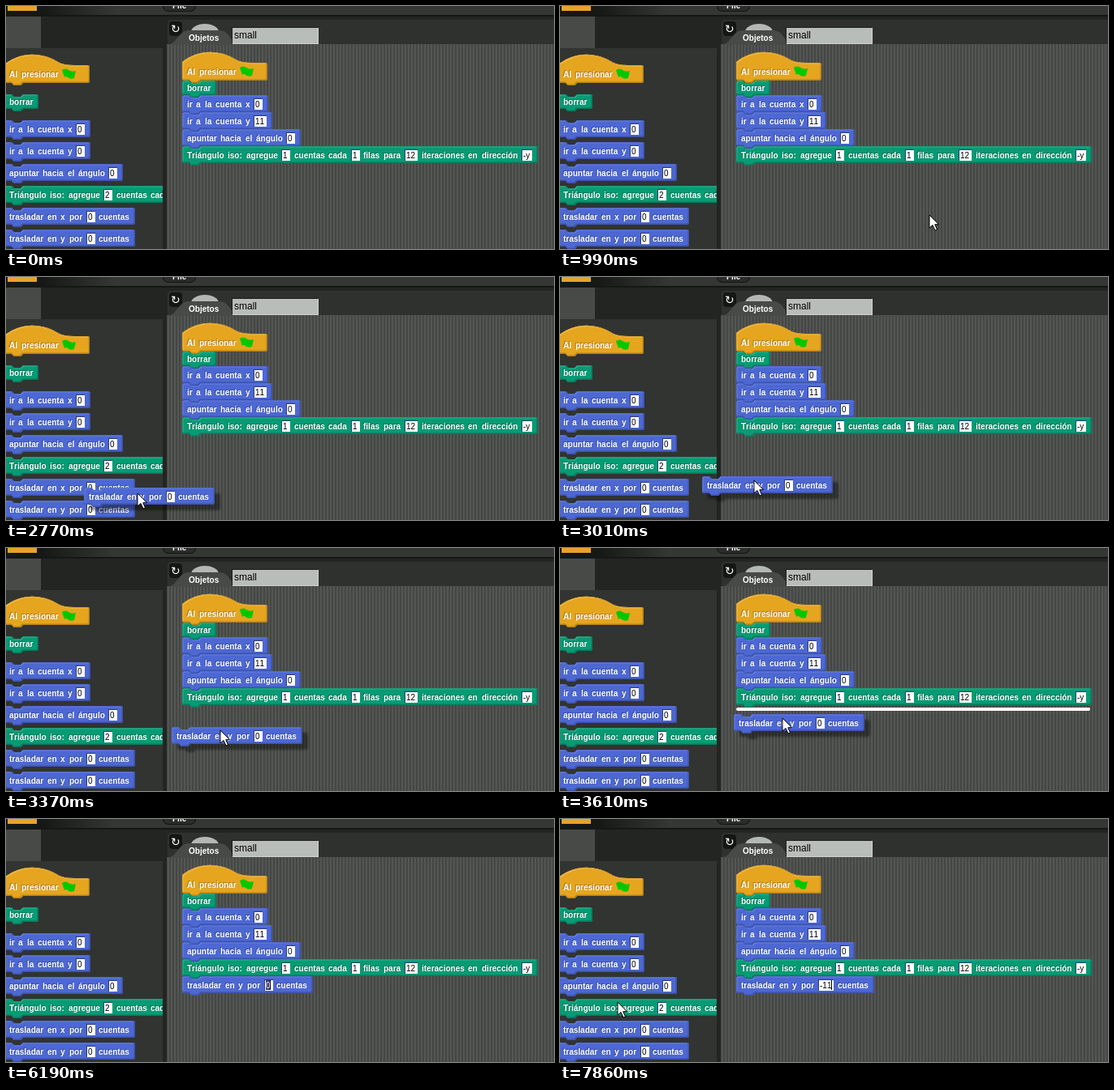
An HTML page with a canvas that plays this animation: 675x300 px, repeating every 8 s.

```html
<!DOCTYPE html>
<html lang="es">
<head>
<meta charset="utf-8">
<style>
html, body { margin: 0; width: 675px; height: 300px; overflow: hidden; background: #232523; }
canvas { display: block; }
</style>
</head>
<body>
<canvas id="stage" width="675" height="300"></canvas>
<script>
const c = document.getElementById('stage').getContext('2d');
c.fontKerning = 'none';
const FONT = '"Liberation Sans", Arial, sans-serif';
const BOLD = `bold 10px ${FONT}`, PLAIN = `10px ${FONT}`;
const GAP = 4.75, PAD = 6, LOOP = 8000;
const BLUE = { base: '#4d68d2', light: '#7189e8', dark: '#3449a0' };
const GREEN = { base: '#079b74', light: '#38bd98', dark: '#066b51' };
const GOLD = { base: '#e6a51f', light: '#f4c45c', dark: '#a97512' };

// Words in brackets are input fields.
const GO_X = 'ir a la cuenta x [0]';
const POINT = 'apuntar hacia el ángulo [0]';
const MOVE = axis => `trasladar en ${axis} por [0] cuentas`;
const TRIANGLE = n => `Triángulo iso: agregue [${n}] cuentas cada [1] filas para [12] iteraciones en dirección [-y]`;

// Times in ms, then position.
const DRAG = [[2490, 3, 287], [3010, 175, 257], [3290, 200, 236], [3370, 204, 232],
  [3610, 214, 216], [3990, 214, 216], [4120, 212, 215], [4160, 212, 215]];
const POINTER = [
  [[500, 76, 296], [700, 50, 284], [990, 50, 284]],
  [[990, 455, 258], [2490, 455, 258]],
  [[2490, 71, 286], [3010, 239, 251], [3290, 260, 229], [3370, 264, 225], [3610, 274, 210],
   [3990, 274, 210], [4160, 272, 209], [4360, 327, 208], [4500, 327, 208], [4540, 318, 206],
   [4720, 318, 206], [4840, 324, 207], [5220, 324, 207], [5470, 340, 301]],
  [[7190, 90, 233], [7360, 78, 232], [7500, 78, 232], [7820, 71, 226], [8000, 71, 226]]
];

function at(keys, t) {
  if (t < keys[0][0]) return null;
  for (let i = 1; i < keys.length; i++) {
    const [t0, x0, y0] = keys[i - 1], [t1, x1, y1] = keys[i];
    if (t < t1) {
      const k = (t - t0) / (t1 - t0);
      return [Math.round(x0 + (x1 - x0) * k), Math.round(y0 + (y1 - y0) * k)];
    }
  }
  return null;
}

function rect(color, x, y, w, h, r = 0) {
  c.fillStyle = color;
  c.beginPath();
  c.roundRect(x, y, w, h, r);
  c.fill();
}

function write(text, x, y, color, font) {
  c.font = font;
  c.fillStyle = color;
  c.fillText(text, x, y);
}

function measure(text, font) {
  c.font = font;
  return c.measureText(text).width;
}

function outline(x, y, w, h, hat) {
  const top = hat
    ? `M${x} ${y} C${x + 20} ${y - 16} ${x + 46} ${y - 16} ${x + 68} ${y - 2} Q${x + 74} ${y + 1} ${x + 86} ${y + 1} `
    : `M${x} ${y + 3} Q${x} ${y} ${x + 3} ${y} H${x + 9} l3 3 h8 l3 -3 `;
  const edge = hat ? y + 1 : y;
  return new Path2D(top + `H${x + w - 3} Q${x + w} ${edge} ${x + w} ${edge + 3} V${y + h - 3} q0 3 -3 3 ` +
    `H${x + 23} l-3 3 h-8 l-3 -3 H${x + 3} q-3 0 -3 -3 Z`);
}

function body(path, color, shadow) {
  c.save();
  c.lineWidth = 2;
  if (shadow) {
    c.shadowColor = 'rgba(0,0,0,.4)';
    c.shadowOffsetX = c.shadowOffsetY = 7;
    c.shadowBlur = 3;
  }
  c.fillStyle = color.base;
  c.fill(path);
  c.shadowColor = 'transparent';
  c.clip(path);
  for (const [d, edge] of [[0.5, color.light], [-0.5, color.dark]]) {
    c.save();
    c.translate(d, d);
    c.globalAlpha = 0.75;
    c.strokeStyle = edge;
    c.stroke(path);
    c.restore();
  }
  c.restore();
}

function label(word, x, cy, color) {
  x = Math.round(x);
  write(word, x - 1, cy + 3, color.dark, BOLD);
  write(word, x, cy + 4, '#fff', BOLD);
}

function field(text, x, cy, w, edit) {
  x = Math.round(x);
  w = Math.round(w);
  rect('#2b3978', x, cy - 7, w, 14);
  rect('#fff', x + 1, cy - 6, w - 1, 13);
  const tw = measure(text, PLAIN);
  const marked = edit && edit.marked;
  if (marked) rect('#3c3c78', x + 2, cy - 6, tw, 12);
  write(text, x + 2, cy + 4, marked ? '#fff' : '#000', PLAIN);
  if (edit && edit.caret) rect('#000', Math.floor(x + 2 + tw), cy - 6, 1, 12);
}

function block(spec, x, cy, color, { shadow, edit } = {}) {
  let pos = x + PAD;
  const parts = spec.split(' ').map(word => {
    const input = word[0] === '[';
    const text = input ? word.slice(1, -1) : word;
    const w = input ? Math.max(10.5, measure(text, PLAIN) + 5) : measure(text, BOLD);
    const part = { input, text, w, x: pos };
    pos += w + GAP;
    return part;
  });
  const tall = parts.some(p => p.input);
  const width = Math.ceil(pos - GAP + PAD + 0.5 - x);
  body(outline(x, cy - (tall ? 11 : 9), width, tall ? 21 : 18), color, shadow);
  for (const p of parts) {
    if (p.input) field(p.text, p.x, cy, p.w, edit);
    else label(p.text, p.x, cy, color);
  }
}

function hat(x, cy) {
  body(outline(x, cy - 12, 105, 23, true), GOLD);
  label('Al', x + 6, cy, GOLD);
  label('presionar', x + 20.8, cy, GOLD);
  c.fillStyle = '#00c800';
  c.fill(new Path2D(`M${x + 71} ${cy - 5} q5 -3 8 0 q4 3 9 1 l-2 9 q-5 2 -8 -1 q-2 -2 -4 0 Z`));
}

function stack(x, rows) {
  for (const [spec, cy, color] of rows) block(spec, x, cy, color);
}

function topBar() {
  const fade = c.createLinearGradient(45, 0, 135, 0);
  fade.addColorStop(0, '#161816');
  fade.addColorStop(1, '#353735');
  rect(fade, 0, 0, 675, 11);
  rect('#151715', 0, 11, 675, 2);
  rect('#e8a32a', 2, -30, 36, 36);
  rect('#111311', 193, -12, 41, 19, 7);
  rect('#2b2d2b', 194, -12, 39, 18, 6);
  write('File', 205, 3, '#fff', BOLD);
}

function frame() {
  rect('#232523', 0, 0, 675, 300);
  topBar();
  rect('#484a48', 0, 13, 43, 39);
  rect('#313431', 0, 52, 193, 248);

  rect('#2f312f', 199, 17, 480, 31, 4);
  rect('#454745', 198, 47, 477, 253);
  for (let x = 199; x < 675; x += 4) rect('#545654', x, 47, 2, 253);

  c.fillStyle = '#b4b8b4';
  c.beginPath();
  c.ellipse(245, 32, 17, 10, 0, 0, 2 * Math.PI);
  c.fill();
  rect('#141614', 201, 19, 16, 18, 4);
  write('↻', 203, 33, '#fff', '14px "DejaVu Sans", sans-serif');
  c.fillStyle = '#484a48';
  c.fill(new Path2D('M198 48 C212 47 211 30 226 30 H262 C278 30 274 47 290 48 Z'));
  write('Objetos', 225, 43, '#fff', BOLD);
  rect('#1b1d1b', 278, 26, 106, 20);
  rect('#d0d4d0', 279, 27, 106, 20);
  rect('#b9bdb9', 279, 27, 105, 19);
  write('small', 281, 40, '#000', `12px ${FONT}`);
}

function palette() {
  c.save();
  c.beginPath();
  c.rect(0, 52, 193, 248);
  c.clip();
  hat(-2, 84);
  stack(-2, [['borrar', 118, GREEN], [GO_X, 152, BLUE], ['ir a la cuenta y [0]', 179, BLUE],
    [POINT, 206, BLUE], [TRIANGLE(2), 233, GREEN], [MOVE('x'), 260, BLUE], [MOVE('y'), 287, BLUE]]);
  c.restore();
}

function script(t) {
  hat(217, 81);
  stack(217, [['borrar', 101, GREEN], [GO_X, 121, BLUE], ['ir a la cuenta y [11]', 142, BLUE],
    [POINT, 163, BLUE], [TRIANGLE(1), 184, GREEN]]);
  if (t < 4160) return;
  const value = t < 6400 ? '0' : t < 6650 ? '-' : t < 6870 ? '-1' : '-11';
  const hidden = (t >= 5740 && t < 6190) || (t >= 7360 && t < 7820);
  const edit = t >= 5220 && { marked: t < 6400, caret: !hidden };
  block(MOVE('y').replace('0', value), 217, 205, BLUE, { edit });
}

function pointer(x, y) {
  const arrow = new Path2D('M0 0 V16 L4 12.5 L7 19 L9.5 18 L6.8 11.7 H11.5 Z');
  c.save();
  c.translate(x, y);
  c.fillStyle = '#fff';
  c.strokeStyle = '#000';
  c.lineWidth = 1;
  c.fill(arrow);
  c.stroke(arrow);
  c.restore();
}

function draw(now) {
  const t = now % LOOP;
  frame();
  palette();
  script(t);
  // Drop marker under the last block of the stack.
  if (t >= 3600 && t < 4160) rect('#fff', 217, 197, 436, 4, 2);
  const drag = at(DRAG, t);
  if (drag) block(MOVE('y'), ...drag, BLUE, { shadow: true });
  for (const keys of POINTER) {
    const p = at(keys, t);
    if (p) pointer(...p);
  }
}

const start = performance.now();
function tick() {
  draw(performance.now() - start);
  requestAnimationFrame(tick);
}
tick();
</script>
</body>
</html>
```
